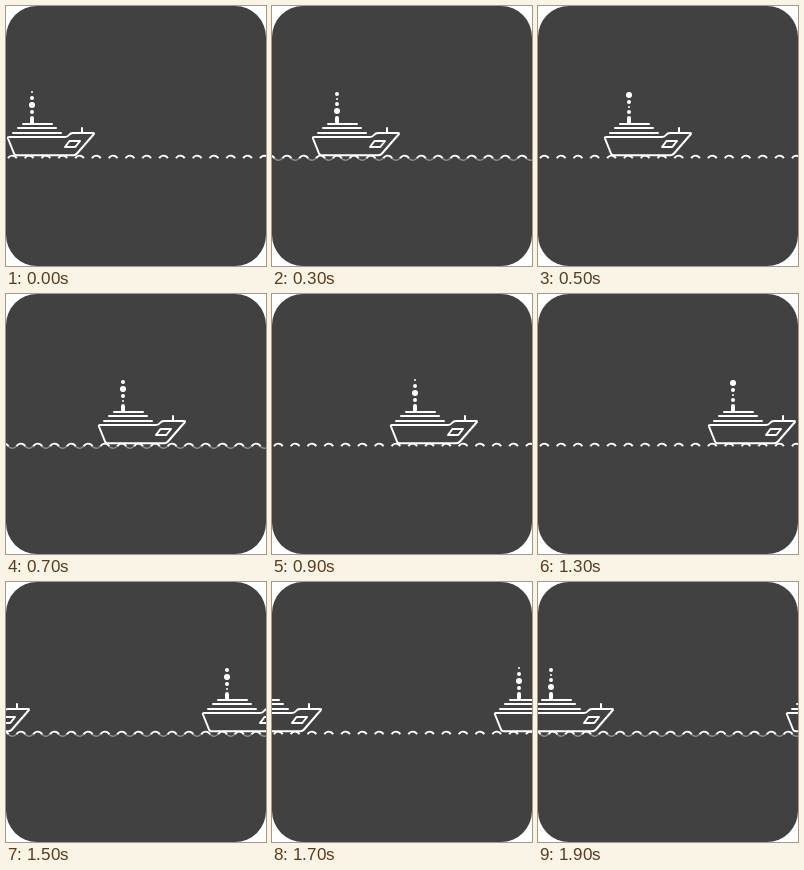
Animation, 260 px wide and 260 px high, one loop 2 s. Source, as an HTML page with a canvas:

```html
<!DOCTYPE html>
<html lang="en">
<head>
<meta charset="utf-8">
<title>Ship</title>
<style>
  html, body { margin: 0; width: 100%; height: 100%; overflow: hidden; background: #fff; }
  canvas { display: block; width: 260px; height: 260px; }
</style>
</head>
<body>
<canvas id="stage"></canvas>
<script>
const SIZE = 260, LOOP = 2000, STEP = 100;
const PAPER = '#424142', INK = '#fff', SHADE = '#8c8c8c';
const WAVE = 16.8;
const canvas = document.getElementById('stage');
const ctx = canvas.getContext('2d');
const ratio = window.devicePixelRatio || 1;
canvas.width = canvas.height = SIZE * ratio;
ctx.scale(ratio, ratio);

// Smoke dots from top to bottom; the radii travel down the column.
const RADII = [1, 2, 3, 2];
const SMOKE_Y = [[86, 92, 99, 106], [88, 93, 98, 105], [89, 96, 101, 106], [88, 95, 102, 107]];

function stroke(color, width) {
  ctx.strokeStyle = color;
  ctx.lineWidth = width;
  ctx.stroke();
}

function bar(x1, x2, y) {
  ctx.beginPath();
  ctx.moveTo(x1 + 1, y);
  ctx.lineTo(x2 - 1, y);
  stroke(INK, 2);
}

function polygon(points) {
  ctx.beginPath();
  points.forEach(([x, y]) => ctx.lineTo(x, y));
  ctx.closePath();
  stroke(INK, 2);
}

function drawHull() {
  ctx.beginPath();
  ctx.moveTo(3, 131);
  ctx.lineTo(59, 131);
  ctx.quadraticCurveTo(61.5, 131, 63, 129);
  ctx.quadraticCurveTo(64.5, 127, 67, 127);
  ctx.lineTo(87, 127);
  ctx.quadraticCurveTo(88.8, 127, 87.5, 128.5);
  ctx.lineTo(71, 147.5);
  ctx.quadraticCurveTo(69.5, 149.3, 67.5, 149.3);
  ctx.lineTo(10.5, 149.3);
  ctx.quadraticCurveTo(8.8, 149.3, 8, 147.5);
  ctx.lineTo(2, 132.5);
  ctx.quadraticCurveTo(1.5, 131, 3, 131);
  ctx.closePath();
  stroke(INK, 2);
}

function drawSmoke(phase) {
  ctx.fillStyle = INK;
  SMOKE_Y[phase].forEach((y, i) => {
    ctx.beginPath();
    ctx.arc(26, y, RADII[(i - phase + 4) % 4], 0, Math.PI * 2);
    ctx.fill();
  });
}

function drawShip(x, phase) {
  ctx.save();
  ctx.translate(x, 0);
  drawHull();
  polygon([[63.5, 135], [74, 135], [69.3, 141], [59, 141]]);
  bar(6, 56, 127);
  bar(11, 51, 122);
  bar(16, 47, 118);
  ctx.beginPath();
  ctx.moveTo(76, 122);
  ctx.lineTo(76, 127);
  stroke(INK, 2);
  ctx.beginPath();
  ctx.roundRect(24, 110, 4, 8, [2, 2, 0, 0]);
  ctx.fillStyle = INK;
  ctx.fill();
  drawSmoke(phase);
  ctx.restore();
}

function drawArcs(start, y, from, to, color, width) {
  for (let x = start - WAVE; x < SIZE + WAVE; x += WAVE) {
    ctx.beginPath();
    ctx.arc(x, y, 5, from * Math.PI, to * Math.PI);
    stroke(color, width);
  }
}

function drawSea(raised) {
  ctx.lineCap = 'butt';
  if (raised) drawArcs(6.3, 149.2, 0.13, 0.87, SHADE, 1.5);
  drawArcs(raised ? 14.9 : 6.3, 154.7, 1.17, 1.83, INK, 2);
}

function draw(time) {
  const tick = Math.floor((time % LOOP) / STEP);
  const beat = Math.floor(tick / 2);
  const shift = tick * SIZE * STEP / LOOP;

  ctx.clearRect(0, 0, SIZE, SIZE);
  ctx.save();
  ctx.beginPath();
  ctx.roundRect(0, 0, SIZE, SIZE, 31);
  ctx.fillStyle = PAPER;
  ctx.fill();
  ctx.clip();
  drawSea(beat % 2 === 1);
  ctx.lineCap = ctx.lineJoin = 'round';
  drawShip(shift, beat % 4);
  drawShip(shift - SIZE, beat % 4);
  ctx.restore();
}

const start = performance.now();
function loop() {
  draw(performance.now() - start);
  requestAnimationFrame(loop);
}
loop();
</script>
</body>
</html>
```
